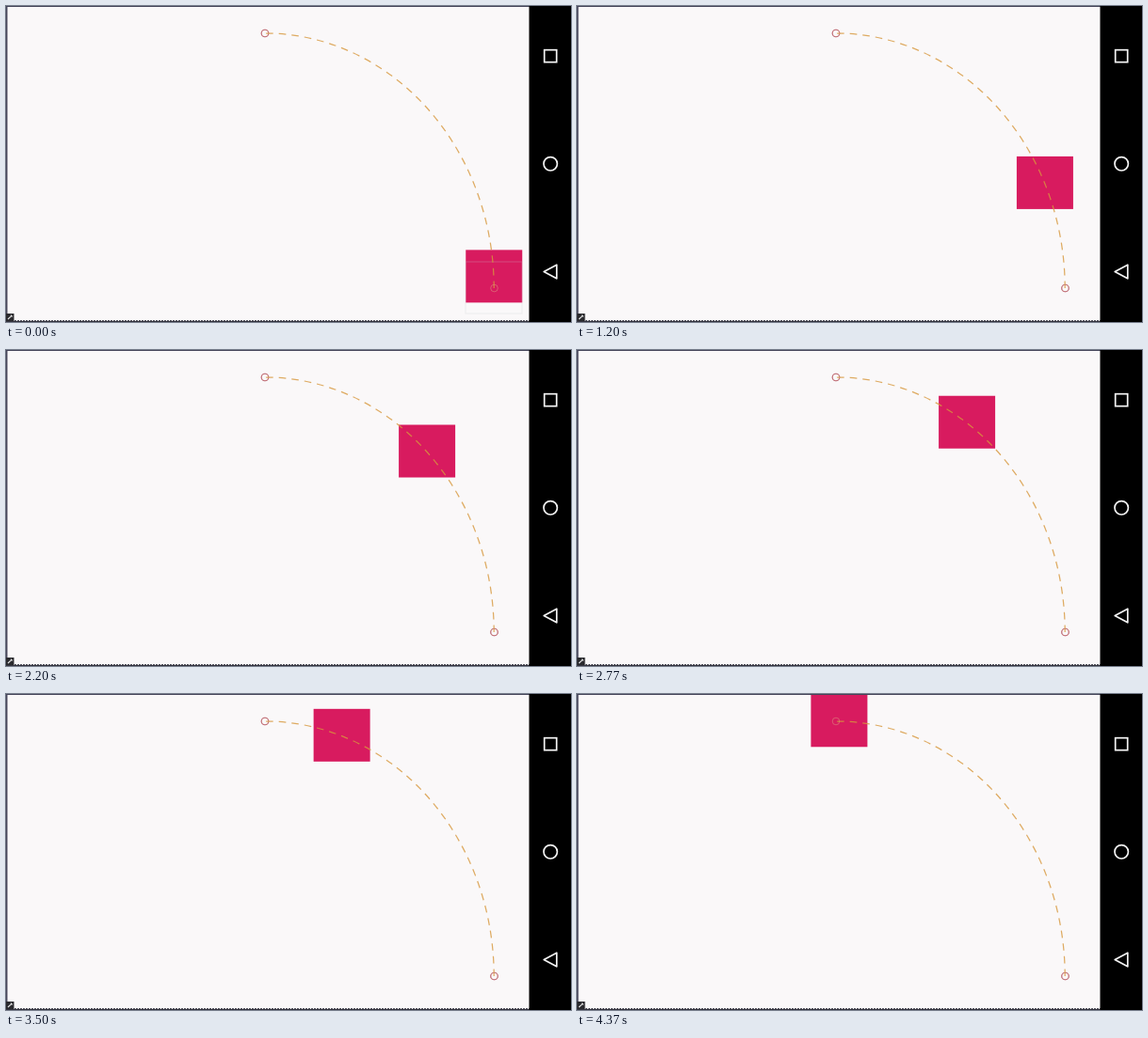
These frames come from a looping animation (600 px wide and 336 px high, 4430 ms). An HTML page:

```html
<!DOCTYPE html>
<html lang="en">
<head>
<meta charset="utf-8">
<title>Arc motion</title>
<style>
  html, body {
    margin: 0;
    width: 100%;
    height: 100%;
    overflow: hidden;
    background: #faf8f9;
  }
  .stage {
    position: absolute;
    left: 0;
    top: 0;
    width: 600px;
    height: 336px;
    overflow: hidden;
  }
  svg {
    position: absolute;
    left: 0;
    top: 0;
    fill: none;
  }
  .box {
    position: absolute;
    left: 0;
    top: 0;
    width: 60px;
    height: 55.5px;
    background: #d81b5f;
    offset-path: path("M518.5 299.5A243 271.5 0 0 0 275.5 28");
    offset-rotate: 0deg;
    animation: travel 4430ms -4ms infinite;
  }
  .rest {
    animation: rest 4430ms -4ms step-end infinite;
  }

  /* Stepped at 30 pictures per second, with short stalls */
  @keyframes travel {
    0% { offset-distance: 3.09%; animation-timing-function: steps(16); }
    12.03% { offset-distance: 12.87%; animation-timing-function: steps(6); }
    16.54% { offset-distance: 17.11%; animation-timing-function: steps(10); }
    24.06% { offset-distance: 24.96%; animation-timing-function: steps(15); }
    35.34%, 36.09% { offset-distance: 37.68%; animation-timing-function: steps(2); }
    37.59% { offset-distance: 39.1%; animation-timing-function: steps(14); }
    48.12%, 48.87% { offset-distance: 49.95%; animation-timing-function: steps(1); }
    49.62%, 50.38% { offset-distance: 51.85%; animation-timing-function: steps(14); }
    60.9% { offset-distance: 61.76%; animation-timing-function: steps(2); }
    62.41%, 63.16% { offset-distance: 63.01%; animation-timing-function: steps(12); }
    72.18%, 72.93% { offset-distance: 73.55%; animation-timing-function: steps(8); }
    78.95% { offset-distance: 79.43%; animation-timing-function: steps(7); }
    84.21%, 84.96% { offset-distance: 84.85%; animation-timing-function: steps(16); }
    96.99% { offset-distance: 98.01%; animation-timing-function: steps(2); }
    98.5%, 100% { offset-distance: 99.27%; }
  }
  @keyframes rest {
    0% { opacity: 1; }
    0.75%, 100% { opacity: 0; }
  }
</style>
</head>
<body>
<div class="stage">
  <svg width="600" height="336" viewBox="0 0 600 336">
    <g stroke="#a02c54" stroke-opacity=".85" stroke-width="1.1">
      <circle cx="275" cy="29" r="3.8"/>
      <circle cx="518.5" cy="300" r="3.8"/>
    </g>
  </svg>

  <div class="box"></div>

  <svg width="600" height="336" viewBox="0 0 600 336">
    <rect class="rest" x="488" y="272" width="60" height="55" stroke="#c8c8d0" stroke-opacity=".28"/>
    <path d="M518.2 300A243 271 0 0 0 275.2 29" stroke="#d8983c" stroke-opacity=".8" stroke-width="1.25" stroke-dasharray="7.6 6.03"/>
    <g stroke="#e0a888" stroke-opacity=".45">
      <circle cx="275" cy="29" r="3.8"/>
      <circle cx="518.5" cy="300" r="3.8"/>
    </g>

    <!-- window edges and corner wrench -->
    <path d="M.75 0V336" stroke="#45455a" stroke-width="1.5"/>
    <path d="M0 .5H556" stroke="#45455a"/>
    <path d="M0 334.5H556" stroke="#55555f" stroke-dasharray="2 1"/>
    <path d="M0 335.5H556" stroke="#34343f"/>
    <rect y="327" width="8.5" height="8" fill="#2a2a2e"/>
    <path d="M2 333L6 329.3M5 328.6L6.8 330.4" stroke="#e8e8e8" stroke-width="1.1"/>

    <!-- navigation bar -->
    <rect x="555.5" width="44.5" height="336" fill="#000"/>
    <g stroke="#f4f4f4" stroke-width="1.7">
      <rect x="571.7" y="46.7" width="13" height="13"/>
      <circle cx="578.2" cy="167.8" r="7.2"/>
      <path d="M571.2 282.5L584.8 275.2V289.8Z" stroke-linejoin="round"/>
    </g>
  </svg>
</div>
</body>
</html>
```
